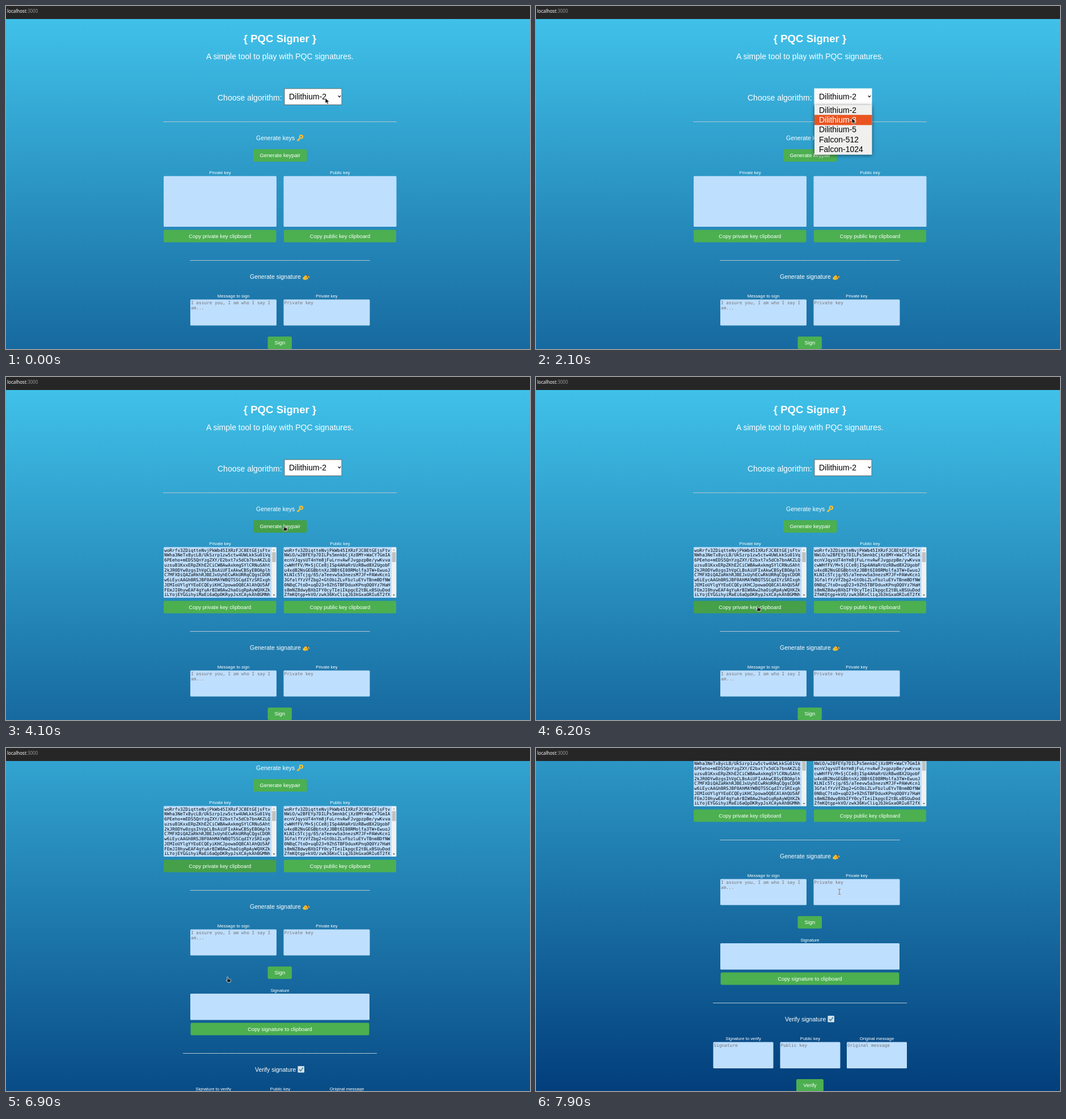
Recreate the animation shown at these times as an HTML page. Size 924 by 606 pixels, loop 8 s.

```html
<!DOCTYPE html>
<html lang="en">
<head>
<meta charset="utf-8">
<title>PQC Signer</title>
<style>
html, body { margin: 0; width: 100%; height: 100%; overflow: hidden; background: #262626; }
svg { display: block; width: 924px; height: 606px; }
text { font-family: "Liberation Sans", Arial, sans-serif; fill: #fff; white-space: pre; }
.mono { font: 7.77px "DejaVu Sans Mono", monospace; fill: #000; }
.hint { fill: #757575; }
.url { font: 8px "Noto Sans", "Open Sans", sans-serif; }
.button rect { fill: #4caf50; }
.button.hover rect { fill: #45a049; }
.dark { fill: #000; }
#menu { filter: drop-shadow(0 1px 3px rgba(0, 0, 0, .55)); }
</style>
</head>
<body>
<svg viewBox="0 0 924 606">
  <defs>
    <linearGradient id="sky" x1="0" y1="0" x2="0" y2="1">
      <stop stop-color="#40c1e9"/><stop offset="1" stop-color="#023e7b"/>
    </linearGradient>
  </defs>
  <g id="page"></g>
  <rect width="924" height="23" fill="#262626"/>
  <text class="url" x="2" y="11.6">localhost<tspan fill="#999">:3000</tspan></text>
  <g id="cursor" stroke-linejoin="round">
    <path id="arrow" d="M0 0V9.6L2.3 7.5L3.9 11L5.6 10.2L4.1 6.9H7.2Z" fill="#111" stroke="#fff" stroke-width=".7"/>
    <path id="hand" d="M-.9 .6Q0-.6 .9 .6L1.3 3.7L5.2 4.6Q6.2 5 6 6.3L5.2 10H.4L-2.3 6.8Q-2.4 5.6-1.2 6L-.3 6.7Z" fill="#222" stroke="#fff" stroke-width=".7"/>
    <g id="beam" fill="none">
      <path d="M-2.4-4.8H-.6L0-4.2L.6-4.8H2.4M0-4.2V4.2M-2.4 4.8H-.6L0 4.2L.6 4.8H2.4" stroke="#fff" stroke-width="1.8"/>
      <path d="M-2.4-4.8H-.6L0-4.2L.6-4.8H2.4M0-4.2V4.2M-2.4 4.8H-.6L0 4.2L.6 4.8H2.4" stroke="#333" stroke-width=".8"/>
    </g>
  </g>
</svg>
<script>
const $ = id => document.getElementById(id);

const privateKey = `woRrfv3ZDiqtteNvjPkWb45IXRzFJC8EtGEjsFtv
NWha3NeTx8ycLB/UkSzrp1zw5ctw4UWLkkSu01Vq
6PEeho+mEDS5QnYzgZXY/E2bxt7x5dCb7bnAKZLQ
uzsuB1KxxERpZKhE2CiCWBAwAxkmgSYlCRNuSAht
2kJR0DYw0zgsIhVpCLBsAiUFIxAkwCBSyEBOAplh
C7MFXDiQAZaRkhRJBEJxUyhECwRkURRqCQgsCDOR
w6iEycAAGhBRSJBF0AhMAYWBQTSSCqdIYzSRIxgh
JEMIoUYlgYYEoECQEyiKHCJpowaOQ8CAlAhQU5AF
FEmJI0hywEAF4gYuArBIW0Aw2haOiqRpAyWQXKZk
iLYojEYGGihyiMaEi6aQpDKRypJsXCAykAhBGMNh`;
const publicKey = `woRrfv3ZDiqtteNvjPkWb45IXRzFJC8EtGEjsFtv
NWiO/w2BFEYp7DILPs5mnkbCjXz8MY+WaCY7GmIA
ecnVJqysUT4nYm8jFuLrnvAwFJvgpzpBe/ywKvva
cwWHfFV/M+SjCCe8jISp4AHaRrUzR8wd8X2UgobF
u4xdB2NsGEGBbtnXzJBBt6I08RMolfa3TW+EwuoJ
KLNIc5Tcjg/65/aTeevw5a3nezsM7JF+PAWvKcn1
3GfalfYzVfZbg2+GtObiZLvFbzluEYvTBnmBDfNW
0N8qC7toD+uqD23+9ZhSTBFDduxKPnqOQ0Yz7HaH
s8mNZ8dwyBXbIFY0cyTIeiIkpgcE2tBLxBSUuDod
ZfmKQtgp+kVO/zwk36KvCliqJb3kGxaORIu6T2fX`;
const algorithms = ["Dilithium-2", "Dilithium-3", "Dilithium-5", "Falcon-512", "Falcon-1024"];

const text = (x, y, size, str, extra = "") => `<text x="${x}" y="${y}" font-size="${size}" ${extra}>${str}</text>`;
const centered = (x, y, size, str, extra = "") => text(x, y, size, str, `text-anchor="middle" ${extra}`);
const box = (x, y, w, h, fill, r = 0, extra = "") =>
  `<rect x="${x}" y="${y}" width="${w}" height="${h}" rx="${r}" fill="${fill}" ${extra}/>`;
const rule = (x, y, w) => box(x, y, w, 1, "#b4c6d2");
const button = (id, x, y, w, label) =>
  `<g id="${id}" class="button">${box(x, y, w, 22, "", 2.5)}${centered(x + w / 2, y + 14, 9.33, label)}</g>`;
const mono = (x, y, str, cls = "") => str.split("\n").map((line, i) =>
  text(x, y + i * 8.74, 7.77, line, `class="mono ${cls}"`)).join("");
const field = (x, y, w, h, label, hint = "") =>
  centered(x + w / 2, y - 3.4, 7.78, label) + box(x, y, w, h, "#bfdffe", 1.5) + mono(x + 1, y + 8.5, hint, "hint");
const keyText = (x, str) => mono(x + 1, 308.7, str) +
  box(x + 190.5, 301, 8, 88.5, "#f1f1f1") + box(x + 191.2, 309.5, 6.6, 17.5, "#c1c1c1") +
  `<path d="M${x + 192.5} 306.4l2-2.2 2 2.2z" fill="#a3a3a3"/><path d="M${x + 192.5} 384.4l2 2.2 2-2.2z" fill="#444"/>`;

const keyIcon = `<g transform="translate(512 227)" fill="none" stroke="#fbc02d">
  <circle cx="8.4" cy="4" r="2.7" stroke-width="2.2"/>
  <path d="M6.3 6.1L1.2 11.2M2.7 9.7l1.8 1.7M4.6 7.8l1.6 1.6" stroke-width="1.7"/></g>`;
const writingIcon = `<g transform="translate(523 473)">
  <path d="M.3 7.4L4.2 3.2L6.6 2.6L8 4L11.2 4.3L12.4 6.4L9.5 9.2L4.7 11L.6 9.8Z" fill="#fbc02d"/>
  <path d="M4 6.8L8.2 5.6M5 8.6l4-1.4" stroke="#c98314" stroke-width=".7"/>
  <path d="M6.4.8L11.8 9.8" stroke="#4b5964" stroke-width="1.3"/></g>`;
const checkIcon = `<g transform="translate(514.5 760)">${box(0, 0, 11.5, 11.5, "#d3e1e9", 1.2)}
  <path d="M2.4 5.9l2.6 2.7 4.4-6" fill="none" stroke="#437b98" stroke-width="1.6"/></g>`;

$("page").innerHTML = box(0, 23, 924, 873, "url(#sky)") +
  centered(483, 63.6, 18.67, "{ PQC Signer }", 'font-weight="bold"') +
  centered(483, 94, 14, "A simple tool to play with PQC signatures.") +
  text(373, 167.4, 14, "Choose algorithm:") +
  box(489.5, 144.5, 104, 31, "#fff", 2, 'id="halo"') +
  box(491, 146, 101, 28.5, "#fff", 0, 'id="select"') +
  text(499, 165, 14, algorithms[0], 'class="dark"') +
  '<path d="M585.6 158.3l2.3 2.5 2.3-2.5" fill="none" stroke="#000" stroke-width="1.2"/>' +
  rule(277, 204, 412) +
  text(441, 237, 10.5, "Generate keys") + keyIcon +
  button("generate", 436, 253, 94.5, "Generate keypair") +
  field(278, 300.5, 199, 89.5, "Private key") + field(489.5, 300.5, 199, 89.5, "Public key") +
  `<g id="keys">${keyText(278, privateKey)}${keyText(489.5, publicKey)}</g>` +
  button("copyPrivate", 278, 395.5, 198.5, "Copy private key clipboard") +
  button("copyPublic", 490, 395.5, 198, "Copy public key clipboard") +
  rule(324.5, 449, 317) +
  text(430, 482, 10.5, "Generate signature") + writingIcon +
  field(325, 518.5, 152, 46, "Message to sign", "I assure you, I am who I say I\nam...") +
  field(489.5, 518.5, 152, 46, "Private key", "Private key") +
  button("sign", 461.5, 584, 42.5, "Sign") +
  field(325, 632, 316, 46.5, "Signature") +
  button("copySignature", 325.5, 683.5, 315, "Copy signature to clipboard") +
  rule(312, 737, 342) +
  text(439, 770, 10.5, "Verify signature") + checkIcon +
  field(312.5, 806.5, 106, 46.5, "Signature to verify", "Signature") +
  field(430.5, 806.5, 106, 46.5, "Public key", "Public key") +
  field(548, 806.5, 106, 46.5, "Original message", "Original message") +
  button("verify", 459, 872, 48, "Verify") +
  `<g id="menu">${box(491, 175, 101.5, 87.7, "#f0f0ef")}${box(491, 175, 101.5, 18, "#e95420", 0, 'id="mark"')}` +
  algorithms.map((name, i) => text(499, 188.5 + i * 17.37, 14, name, 'class="item"')).join("") + "</g>";

// Pointer stops: time, x, y, shape
const stops = [
  [0, 563, 162.5, "arrow"], [100, 573, 163, "arrow"], [200, 581, 163, "arrow"], [400, 582, 163, "arrow"],
  [1400, 565.5, 186, "arrow"], [1500, 563, 204, "arrow"], [1600, 560, 222, "arrow"],
  [1700, 558, 240, "arrow"], [1800, 556, 249, "arrow"], [1900, 556, 234, "arrow"],
  [2000, 556, 216, "arrow"], [2100, 557, 198, "arrow"], [2200, 557, 183, "arrow"],
  [2700, 551, 192, "arrow"], [2800, 531, 222, "arrow"], [2900, 508, 254, "hand"],
  [3000, 492, 272, "hand"], [3100, 489, 274, "hand"], [3200, 489, 267, "hand"], [3300, 490, 262, "hand"],
  [4600, 487, 267, "hand"], [4700, 478, 284, "arrow"], [4800, 465, 304, "beam"],
  [4900, 450, 326, "beam"], [5000, 434, 348, "beam"], [5100, 418, 370, "beam"],
  [5200, 405, 387, "beam"], [5300, 396, 398, "hand"], [5400, 391, 403, "hand"],
  [5500, 389, 403, "hand"], [5600, 390.5, 404, "hand"],
  [7500, 396, 401, "hand"], [7600, 415, 380, "beam"], [7700, 460, 330, "arrow"],
  [7800, 508, 280, "arrow"], [7900, 535, 254, "beam"]
];
const scrolls = [22, 84, 146, 198, 243, 276, 287];
const items = [...document.querySelectorAll(".item")];

const show = (id, on) => $(id).setAttribute("visibility", on ? "visible" : "hidden");
const hover = (id, on) => $(id).classList.toggle("hover", on);

function draw(now) {
  const t = Math.floor(now % 8000 / 100) * 100;
  const within = (from, to) => t >= from && t < to;
  const [, x, y, shape] = stops.findLast(s => s[0] <= t);
  $("cursor").setAttribute("transform", `translate(${x} ${y})`);
  for (const id of ["arrow", "hand", "beam"]) show(id, id === shape);

  const open = within(600, 2500), focused = within(2500, 4000);
  const chosen = t < 1400 ? 0 : Math.max(0, Math.min(4, Math.floor((y - 175) / 17.37)));
  $("menu").style.display = open ? "" : "none";
  $("mark").setAttribute("y", 175 + chosen * 17.37);
  items.forEach((item, i) => item.style.fill = i === chosen ? "#fff" : "#000");
  show("halo", focused);
  $("select").setAttribute("stroke", focused ? "#101010" : open ? "#fff" : "#666");
  $("select").setAttribute("stroke-width", focused ? 1.8 : .9);
  $("select").setAttribute("rx", focused ? 1 : 0);

  show("keys", t >= 4000);
  hover("generate", within(2900, 4700));
  hover("copyPrivate", within(5300, 7500));
  hover("copySignature", within(7500, 7600));
  const scroll = t < 6600 ? 0 : scrolls[Math.min(6, (t - 6600) / 100)];
  $("page").setAttribute("transform", `translate(0 ${-scroll})`);
  requestAnimationFrame(() => draw(performance.now()));
}
draw(performance.now());
</script>
</body>
</html>
```
